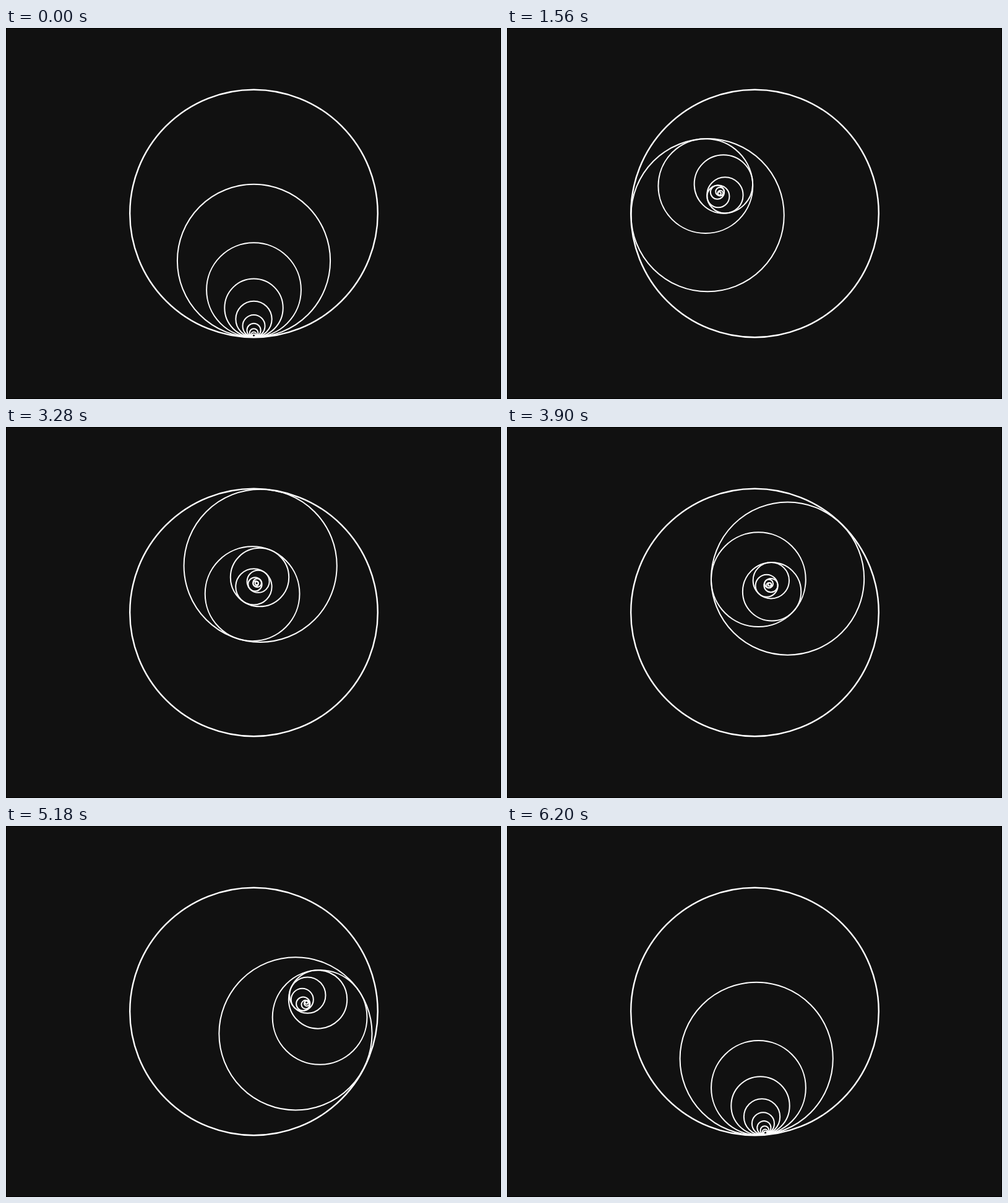
Animation of 800 by 600 pixels, one loop 6240 ms. Source, as an HTML page:

```html
<!DOCTYPE html>
<html lang="en">
<head>
<meta charset="utf-8">
<title>Golden circles</title>
<style>
  html, body { margin: 0; width: 100%; height: 100%; overflow: hidden; background: #111; }
  svg { display: block; width: 100%; height: 100%; }
</style>
</head>
<body>
<svg viewBox="0 0 800 600">
  <rect width="800" height="600" fill="#111"/>
  <rect x=".5" y=".5" width="799" height="599" fill="none" stroke="#000"/>
  <g id="rings" fill="none" stroke="#fff" stroke-width="2"></g>
</svg>
<script>
const LOOP = 6240, TICK = 20, STEP = 2;
const COUNT = 10, RADIUS = 200, PHI = (1 + Math.sqrt(5)) / 2;
const CENTER = { x: 400.5, y: 300 };
// [time in ms, turn in degrees]
const PACE = [[0, 0], [20, 2], [620, 32], [2560, 148.3], [LOOP, 360.4]];

const group = document.getElementById('rings');
const rings = Array.from({ length: COUNT }, (_, i) => {
  const node = document.createElementNS('http://www.w3.org/2000/svg', 'circle');
  const r = RADIUS / PHI ** i;
  node.setAttribute('r', i ? r : r + 0.3);
  if (!i) node.setAttribute('stroke-width', 2.4);
  group.append(node);
  return { node, r };
});

function turnAt(ms) {
  const t = Math.floor(ms / TICK) * TICK;
  const next = PACE.findIndex(([time]) => time > t);
  const [t0, a0] = PACE[next - 1], [t1, a1] = PACE[next];
  const angle = a0 + (a1 - a0) * (t - t0) / (t1 - t0);
  return Math.floor(angle / STEP + 1e-6) * STEP * Math.PI / 180;
}

// Each ring touches its parent from inside, turned once more than the parent.
function draw(ms) {
  const turn = turnAt(ms);
  let { x, y } = CENTER;
  rings.forEach(({ node, r }, i) => {
    if (i) {
      const gap = rings[i - 1].r - r;
      x -= gap * Math.sin(i * turn);
      y += gap * Math.cos(i * turn);
    }
    node.setAttribute('cx', x);
    node.setAttribute('cy', y);
  });
}

const start = performance.now();
function frame() {
  draw((performance.now() - start) % LOOP);
  requestAnimationFrame(frame);
}
frame();
</script>
</body>
</html>
```
